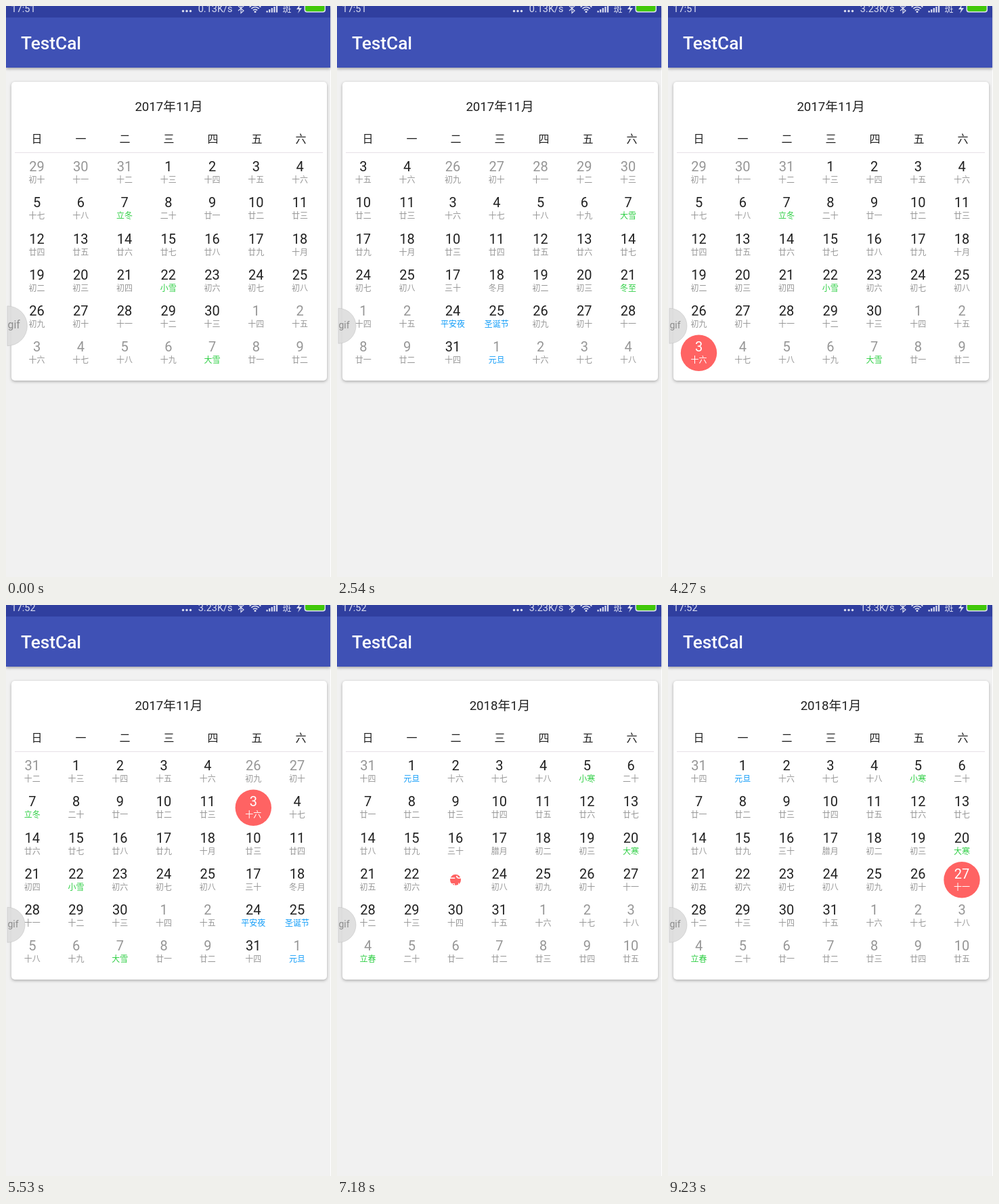
An HTML page with a canvas that plays this animation: 480x843 px, repeating every 9.93 s.

```html
<!DOCTYPE html>
<html lang="zh-CN">
<head>
<meta charset="utf-8">
<style>
html, body { margin: 0; height: 100%; overflow: hidden; background: #fff; }
canvas { display: block; }
</style>
</head>
<body>
<canvas id="stage" width="480" height="843"></canvas>
<script>
const ctx = document.getElementById('stage').getContext('2d');
const LOOP = 9930, PAGE_LEFT = 13, PAGE_WIDTH = 456, PAGES = 3;
const FONT = 'Roboto, "Noto Sans CJK SC", "Noto Sans CJK", sans-serif';
const INK = '#212121', GREY = '#969696', GREEN = '#2fcf45', BLUE = '#109cf8', TINT = '#dcdff0';

// The title follows a little after the page has settled.
const SWIPES = [
  { start: 2200, end: 2726, from: 0, to: 1, titled: 2970 },
  { start: 3690, end: 4270, from: 1, to: 0, titled: 4270 },
  { start: 5150, end: 6185, from: 0, to: 1, titled: 6310 },
  { start: 6350, end: 6740, from: 1, to: 2, titled: 6990 }
];

// Days count from the first visible cell, 29 October 2017.
const ORIGIN = new Date(2017, 9, 29);
const TAPS = [
  { start: 430, day: 16 }, { start: 1180, day: 7 }, { start: 2970, day: 35 },
  { start: 7180, day: 86 }, { start: 7790, day: 70 }, { start: 8560, day: 90 }
];
const GROWTH = 480;

const FEASTS = { 56: '平安夜', 57: '圣诞节', 64: '元旦' };
const TERMS = {};
'立冬 小雪 大雪 冬至 小寒 大寒 立春'.split(' ')
  .forEach((name, i) => TERMS[Math.round(9 + 14.8 * i)] = name);

const clamp = u => Math.min(1, Math.max(0, u));
const ease = u => (1 - Math.cos(Math.PI * clamp(u))) / 2;
const monthStart = page => new Date(2017, 10 + page, 1);

function lunarName(day) {
  // The first lunar month shown starts on its tenth day and is one day short.
  const n = day < 20 ? day + 10 : (day - 20) % 30 + 1;
  if (n === 1) return ['十月', '冬月', '腊月'][(day - 20) / 30];
  if (n === 20) return '二十';
  if (n === 30) return '三十';
  const tens = n <= 10 ? '初' : n < 20 ? '十' : '廿';
  return tens + '十一二三四五六七八九'[n % 10];
}

function text(str, x, y, size, color, align = 'center', weight = 400) {
  ctx.font = `${weight} ${size}px ${FONT}`;
  ctx.textAlign = align;
  ctx.fillStyle = color;
  ctx.fillText(str, x, y);
}

function rect(x, y, w, h, color, radius = 0) {
  ctx.fillStyle = color;
  ctx.beginPath();
  ctx.roundRect(x, y, w, h, radius);
  ctx.fill();
}

function circle(x, y, r, color) {
  ctx.fillStyle = color;
  ctx.beginPath();
  ctx.arc(x, y, r, 0, Math.PI * 2);
  ctx.fill();
}

function raisedRect(x, y, w, h, color, radius) {
  ctx.save();
  ctx.shadowColor = 'rgba(0,0,0,.3)';
  ctx.shadowBlur = 4;
  ctx.shadowOffsetY = 1.5;
  rect(x, y, w, h, color, radius);
  ctx.restore();
}

function drawStatusBar(t) {
  rect(0, 0, 479, 17, '#303f9f');
  text(t < 5230 ? '17:51' : '17:52', 7.5, 9, 14.5, TINT, 'left');
  const speed = t < 2730 ? '0.13K/s' : t < 7860 ? '3.23K/s' : '13.3K/s';
  text(speed, 334.5, 9, 14.5, TINT, 'right');
  text('斑', 415, 9, 13, TINT);
  for (let i = 0; i < 3; i++) circle(261.5 + 5.5 * i, 7.5, 1.7, TINT);

  ctx.strokeStyle = TINT;
  ctx.lineWidth = 1.2;
  ctx.stroke(new Path2D('M343 0 L351 7 L347 10.5 V-4 L351 0 L343 7'));
  ctx.lineWidth = 1.7;
  for (let r = 4; r < 12; r += 3.5) {
    ctx.beginPath();
    ctx.arc(368, 9, r, -Math.PI * .77, -Math.PI * .23);
    ctx.stroke();
  }
  circle(368, 8.5, 1.5, TINT);
  for (let i = 0; i < 5; i++) rect(384.5 + i * 3.6, 7 - i * 2, 2.2, 2.5 + i * 2, TINT);
  ctx.fillStyle = TINT;
  ctx.fill(new Path2D('M434 -2 L429 5 H433 L431 11 L437 3 H433 Z'));
  rect(440.5, -5, 31.5, 14.5, TINT, 4);
  rect(442, -4, 28.5, 12, '#41c808', 3);
}

function drawPage(page, left, t) {
  const month = monthStart(page);
  const tap = TAPS.findLast(tap => tap.start <= t);
  for (let i = 0; i < 42; i++) {
    const date = new Date(2017, 10 + page, 1 - month.getDay() + i);
    const day = Math.round((date - ORIGIN) / 864e5);
    const x = left + 32.5 + 64.75 * (i % 7);
    const y = 53.25 * Math.floor(i / 7);
    const chosen = tap && tap.day === day;
    if (chosen) circle(x, 246 + y, 8 + 18.7 * clamp((t - tap.start) / GROWTH), '#ff6363');

    const dayColor = date.getMonth() === month.getMonth() ? INK : GREY;
    const noteColor = TERMS[day] ? GREEN : FEASTS[day] ? BLUE : GREY;
    text(date.getDate(), x, 244 + y, 20, chosen ? '#fff' : dayColor);
    text(TERMS[day] || FEASTS[day] || lunarName(day), x, 261 + y, 12, chosen ? '#fff' : noteColor);
  }
}

function drawCard(t) {
  raisedRect(8, 112, 466, 441, '#fff', 5);
  const titled = SWIPES.findLast(swipe => swipe.titled <= t);
  const month = monthStart(titled ? titled.to : 0);
  text(`${month.getFullYear()}年${month.getMonth() + 1}月`, 240.5, 154.7, 18.67, INK);
  [...'日一二三四五六'].forEach((name, i) => text(name, 45.5 + 65 * i, 202, 16, INK));
  rect(PAGE_LEFT, 216, 455, 1, '#e6e0e6');

  const swipe = SWIPES.findLast(swipe => swipe.start <= t) || { ...SWIPES[0], to: 0 };
  const progress = ease((t - swipe.start) / (swipe.end - swipe.start));
  const position = swipe.from + (swipe.to - swipe.from) * progress;
  ctx.save();
  ctx.beginPath();
  ctx.rect(PAGE_LEFT, 217, PAGE_WIDTH, 330);
  ctx.clip();
  for (let page = 0; page < PAGES; page++) {
    const offset = page - position;
    if (Math.abs(offset) < 1) drawPage(page, PAGE_LEFT + offset * PAGE_WIDTH, t);
  }
  ctx.restore();
}

function drawBubble(t) {
  const scale = t < 90 ? 1.13 : 1;
  ctx.beginPath();
  ctx.arc(2, 472.3, 26 * scale, -Math.PI / 2, Math.PI / 2);
  ctx.closePath();
  ctx.fillStyle = 'rgba(222,222,222,.92)';
  ctx.fill();
  ctx.strokeStyle = 'rgba(190,190,190,.5)';
  ctx.lineWidth = 1;
  ctx.stroke();
  text('gif', 2.5, 475.5, 14 * scale, '#8c8c8c', 'left');
}

function frame(now) {
  const t = now % LOOP;
  rect(0, 0, 480, 843, '#fff');
  rect(0, 0, 479, 843, '#f1f1f1');
  raisedRect(0, 0, 479, 91, '#3f51b5');
  drawStatusBar(t);
  text('TestCal', 22, 64, 26.2, '#fff', 'left', 500);
  drawCard(t);
  drawBubble(t);
  requestAnimationFrame(frame);
}
requestAnimationFrame(frame);
</script>
</body>
</html>
```
